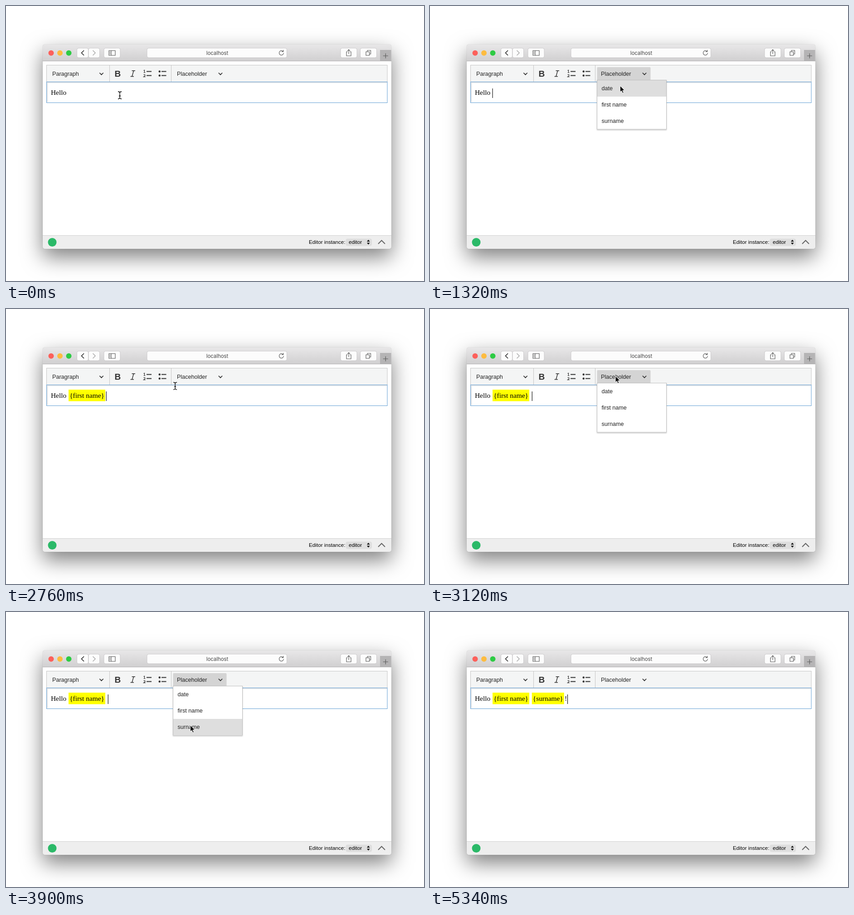
Recreate the animation shown at these times as an HTML page. Size 922 px wide and 607 px high, loop 5.64 s.

```html
<!DOCTYPE html>
<html lang="en">
<head>
<meta charset="utf-8">
<title>Placeholder editor</title>
<style>
  html, body { margin: 0; width: 100%; height: 100%; overflow: hidden; background: #fff; }
  #win { position: absolute; left: 81px; top: 85px; width: 769px; height: 451px; border-radius: 5px;
    background: #fff; box-shadow: 0 18px 46px rgba(0,0,0,.5), 0 0 1px rgba(0,0,0,.45); }
  svg { position: absolute; left: 0; top: 0; }
  text { font: 12.6px "Liberation Sans", Arial, sans-serif; fill: #222; }
  .serif { font: 15.4px "Liberation Serif", Times, serif; fill: #000; }
  .small { font-size: 11.7px; fill: #000; }
  .url { font: 11.4px Inter, sans-serif; fill: #444; text-anchor: middle; }
  .line { fill: none; stroke: #333; stroke-width: 1.7; }
  .thin { fill: none; stroke: #555; stroke-width: 1.1; }
  .key rect { fill: #fcfcfc; stroke: #c3c1c3; stroke-width: .8; }
</style>
</head>
<body>
<div id="win"></div>
<svg width="922" height="607" viewBox="0 0 922 607">
  <defs>
    <linearGradient id="bar" x2="0" y2="1"><stop stop-color="#e8e7e8"/><stop offset="1" stop-color="#d0cfd0"/></linearGradient>
    <filter id="drop" x="-10%" y="-10%" width="120%" height="125%"><feDropShadow dx="0" dy="1.5" stdDeviation="1.2" flood-opacity=".25"/></filter>
  </defs>

  <!-- window frame -->
  <path d="M81 122V90a5 5 0 0 1 5-5H845a5 5 0 0 1 5 5V122z" fill="url(#bar)"/>
  <path d="M81 121.5H850" stroke="#b4b3b4"/>
  <circle cx="99.5" cy="103.7" r="6" fill="#fc605b"/>
  <circle cx="119" cy="103.7" r="6" fill="#fdbc40"/>
  <circle cx="138.5" cy="103.7" r="6" fill="#2ecb44"/>
  <g class="key">
    <rect x="156.5" y="93" width="25" height="21" rx="3.5"/>
    <rect x="182" y="93" width="24.5" height="21" rx="3.5"/>
    <rect x="216" y="93" width="36" height="21" rx="3.5"/>
    <rect x="311" y="93" width="308.5" height="21" rx="3.5"/>
    <rect x="738" y="93" width="36" height="21" rx="3.5"/>
    <rect x="781.5" y="93" width="36" height="21" rx="3.5"/>
  </g>
  <path class="line" d="M172 98l-5.5 5.5 5.5 5.5"/>
  <path class="line" d="M191.500 98l5.500 5.500-5.500 5.500" style="stroke:#aaa;stroke-width:1.500"/>
  <g class="thin">
    <path d="M227 98.500h14v10.500h-14zM232 98.500v10.500M228.500 101h2M228.500 103.500h2M228.500 106h2"/>
    <path d="M611 100.200a4.900 4.900 0 1 0 1.300 3.500M611.700 97v3.600h-3.600"/>
    <path d="M753.500 101h-2.500v9h10v-9h-2.500M756 106v-9.500M753 99.200l3-3 3 3"/>
    <path d="M794 101h7.500v8h-7.500zM797 101v-3h7.500v8h-3"/>
  </g>
  <rect x="825" y="97" width="24.500" height="25" fill="#b5b4b5"/>
  <path class="thin" d="M837.300 104.500v11M831.800 110h11"/>
  <text class="url" x="466" y="108">localhost</text>

  <!-- footer -->
  <path d="M81 507H850V531a5 5 0 0 1-5 5H86a5 5 0 0 1-5-5z" fill="#eee"/>
  <path d="M81 506.500H850" stroke="#d2d2d2"/>
  <circle cx="102" cy="521.500" r="9.500" fill="#2bb968"/>
  <text class="small" x="668" y="525">Editor instance:</text>
  <rect x="749.500" y="513.500" width="57.500" height="16" rx="4" fill="#dedede"/>
  <text class="small" x="756" y="525">editor</text>
  <path d="M796 520l3.300-4 3.300 4zM796 522.500l3.300 4 3.300-4z"/>
  <path d="M821 525l7.500-7.500 7.500 7.500" fill="none" stroke="#666" stroke-width="2"/>

  <!-- editable area and toolbar -->
  <rect x="89.500" y="130.500" width="751.500" height="37" fill="#f4f5f5" stroke="#c4c4c4"/>
  <path d="M228.500 131V167M364.500 131V167" stroke="#c4c4c4"/>
  <rect id="area" x="89.500" y="167.500" width="751.500" fill="#fff" stroke="#629fd3"/>
  <path d="M91 212V169H840" fill="none" stroke="#e4e4e6" stroke-width="2"/>
  <rect id="hot" x="368.500" y="135" width="118" height="29" rx="2" fill="#d4d4d4"/>
  <text x="102" y="154">Paragraph</text>
  <text x="377" y="154">Placeholder</text>
  <path class="line" d="M206.300 147.500l4.200 4.200 4.200-4.200M468.800 147.500l4.200 4.200 4.200-4.200"/>
  <g id="styles">
    <text x="239.500" y="155.500" style="font-size:19px;font-weight:bold;fill:#333">B</text>
    <path class="line" d="M277.500 142.700h7.500M274.500 155.500h7.500M281.600 142.700l-3.600 12.800" style="stroke-width:1.500"/>
  </g>
  <path class="line" d="M310 144.500h11M310 153.500h11M343 144.500h10.500M343 153.500h10.500" style="stroke-width:1.900"/>
  <path class="line" d="M303.500 142.500l2-1v5.500M303.500 147h4M303.500 152.300q2-1.800 3.500 0q.5 1.500-3.300 4h4" style="stroke-width:1.200"/>
  <circle cx="338.700" cy="144.500" r="2.200" fill="#333"/>
  <circle cx="338.700" cy="153.500" r="2.200" fill="#333"/>

  <!-- content -->
  <text class="serif" x="99" y="195.500">Hello</text>
  <g id="first">
    <rect x="138" y="178" width="81" height="25.500" fill="#ff0"/>
    <rect class="ring" x="138.700" y="178.700" width="79.800" height="24.300" fill="none" stroke="#47a0f3" stroke-width="3"/>
    <text class="serif" x="140.200" y="195.500">{first name}</text>
  </g>
  <g id="last">
    <rect x="224.700" y="178" width="71" height="25.500" fill="#ff0"/>
    <rect class="ring" x="225.400" y="178.700" width="69.800" height="24.300" fill="none" stroke="#47a0f3" stroke-width="3"/>
    <text class="serif" x="226.800" y="195.500">{surname}</text>
  </g>
  <text id="bang" class="serif" x="297" y="195.500">!</text>
  <path id="caret" d="M0 182V203" stroke="#000" stroke-width="1.100"/>

  <!-- menu -->
  <g id="menu">
    <rect x="368.500" y="163.500" width="153" height="108.500" fill="#fff" stroke="#bfbfbf" filter="url(#drop)"/>
    <rect id="item" x="369" width="152" height="36" fill="#dedede"/>
    <text x="378.500" y="186">date</text>
    <text x="378.500" y="222">first name</text>
    <text x="378.500" y="258">surname</text>
  </g>

  <!-- pointer -->
  <g id="mouse">
    <circle id="click" r="21" fill="none" stroke="#000" stroke-width="1.600"/>
    <path id="arrow" d="M0 0V14l3.200-3 2.300 5.300 2.400-1-2.300-5.100h4.400z" stroke="#fff" stroke-width="1"/>
    <path id="beam" d="M-4-8q3.500 0 4 2q.5-2 4-2M0-6.500V6.500M-4 8q3.500 0 4-2q.5 2 4 2M-2 1.500h4" fill="none" stroke="#000" stroke-width="1.300"/>
  </g>
</svg>
<script>
const LOOP = 5640, STEP = 60;
const $ = id => document.getElementById(id);
const show = (el, on) => { el.style.display = on ? '' : 'none'; };
const during = (t, ...spans) => spans.some(([a, b]) => t >= a && t < b);

// pointer moves: start, end, target x, target y
const moves = [
  [60, 720, 419.5, 154], [1140, 1560, 419, 210], [1980, 2400, 307, 210],
  [2580, 2880, 409, 148], [3180, 3510, 406.5, 250], [3960, 4320, 333, 200]
];
// caret: start, end, x
const carets = [
  [180, 720, 138], [1260, 1800, 138], [2520, 2820, 221.3], [2820, 3360, 225.2],
  [3900, 3960, 225.2], [4440, 4980, 297.5], [5100, LOOP, 303.5]
];

function pointer(t) {
  let x = 251, y = 197;
  for (const [a, b, tx, ty] of moves) {
    const p = Math.min(1, Math.max(0, (t - a) / (b - a)));
    const e = p * p * (3 - 2 * p);
    x += (tx - x) * e;
    y += (ty - y) * e;
  }
  return [x, y];
}

function draw(t) {
  const [x, y] = pointer(t);
  const pickFirst = during(t, [1800, 2520]);
  const pickLast = during(t, [3960, 4440]);
  const picked = pickFirst || pickLast;
  const arrow = during(t, [720, 1860], [2880, 4200]);

  $('area').setAttribute('height', picked ? 47.5 : 46);
  $('styles').style.opacity = picked ? .5 : 1;
  show($('hot'), during(t, [720, 1800], [2880, 3960]));
  show($('menu'), during(t, [900, 1800], [3120, 3960]));
  show($('item'), y >= 164);
  $('item').setAttribute('y', 164 + 36 * Math.floor((y - 164) / 36));

  show($('first'), t >= 1800);
  show($('last'), t >= 3960);
  show(document.querySelector('#first .ring'), pickFirst);
  show(document.querySelector('#last .ring'), pickLast);
  show($('bang'), t >= 5100);

  const caret = carets.find(c => during(t, c));
  show($('caret'), caret);
  if (caret) $('caret').setAttribute('transform', `translate(${caret[2]})`);

  show($('mouse'), t < 5100);
  $('mouse').setAttribute('transform', `translate(${x} ${y})`);
  show($('arrow'), arrow);
  show($('beam'), !arrow);
  show($('click'), during(t, [780, 900], [1620, 1800], [3000, 3120], [3660, 3840]));
}

const start = performance.now();
function tick() {
  const t = (performance.now() - start) % LOOP;
  draw(Math.floor(t / STEP) * STEP);
  requestAnimationFrame(tick);
}
tick();
</script>
</body>
</html>
```
